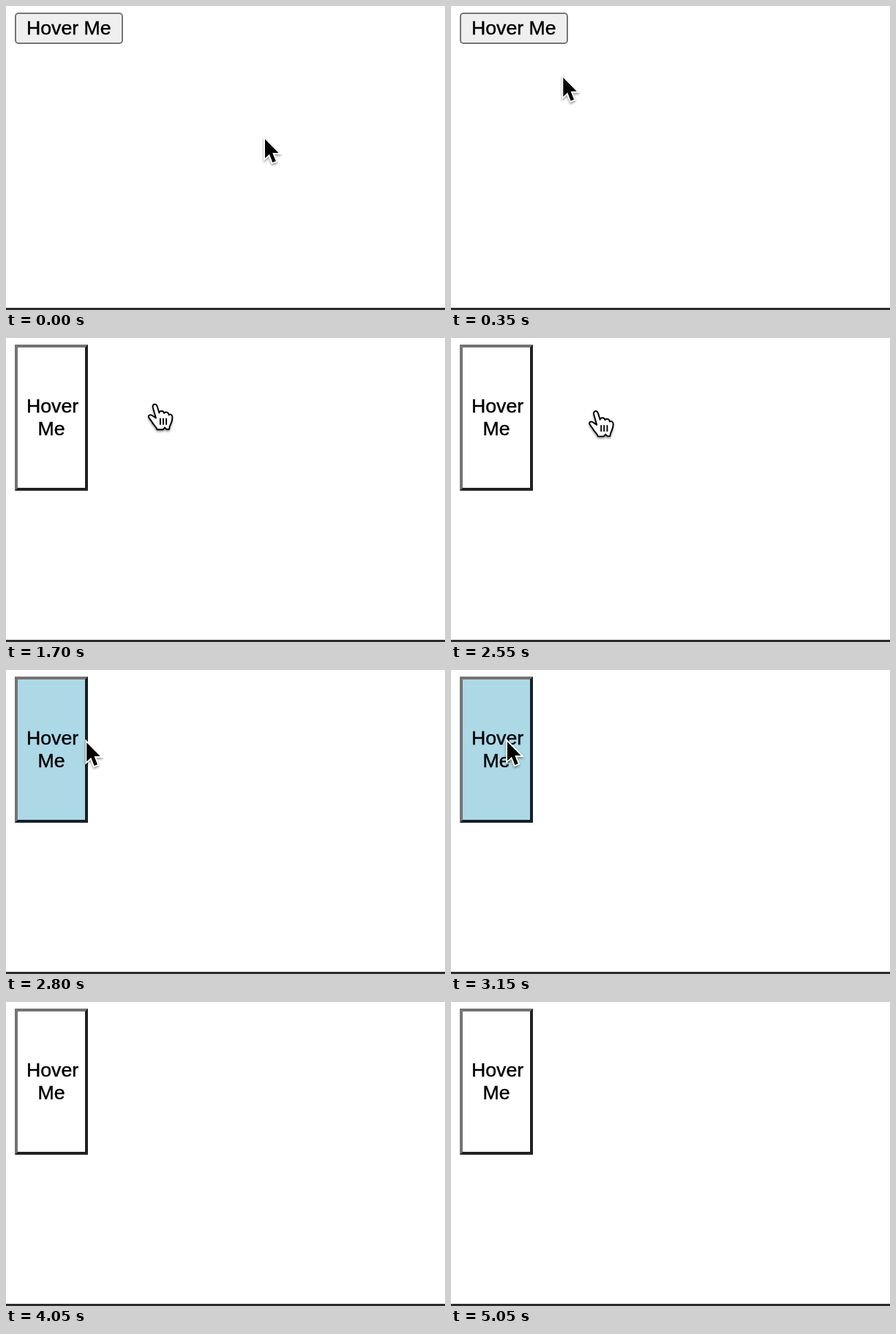
Animation of 600 by 416 pixels, one loop 5430 ms. Source, as an HTML page:

```html
<!DOCTYPE html>
<html lang="en">
<head>
<meta charset="utf-8">
<title>Hover button</title>
<style>
  html, body { margin: 0; width: 100%; height: 100%; overflow: hidden; background: #fff; }
  svg { display: block; width: 100%; height: 100%; }
  text {
    font: 26.667px "Liberation Sans", Arial, sans-serif;
    fill: #000; stroke: #000; stroke-width: .45px;
  }
  .shadow { filter: drop-shadow(0 2px 1.5px rgba(0, 0, 0, .4)); }
</style>
</head>
<body>
<svg viewBox="0 0 600 416">
  <rect y="413" width="600" height="3" fill="#2c2c2c"/>

  <g id="plain">
    <rect x="13" y="10" width="146" height="41" rx="4" fill="#efefef" stroke="#767676" stroke-width="2"/>
  </g>
  <g id="outset" transform="translate(12 9)">
    <rect id="dark"/>
    <path id="light" fill="#747474"/>
    <rect id="face" x="4" y="4"/>
  </g>
  <text id="oneLine" x="28" y="39">Hover Me</text>
  <g id="twoLines">
    <text x="28" y="102">Hover</text>
    <text x="43.5" y="133">Me</text>
  </g>

  <g id="arrow" class="shadow">
    <path d="M1 3.2V29.2L7 23.7L11.3 35L15.8 33.2L11.3 22H19.5Z"
      fill="#000" stroke="#fff" stroke-width="3.8" paint-order="stroke"/>
  </g>
  <g id="hand" class="shadow" stroke="#000" stroke-width="1.9" stroke-linecap="round" stroke-linejoin="round">
    <path fill="#fff" d="M11.5 20.5L7.5 6.5C6.3 1 11.7 0 13.2 4.5L16 13.5
      C16 10 22 10 22.8 14C24 11.5 28.5 12 29.3 16.2C31.5 14.5 34 16.5 34 19.5
      C34 25.5 32 28 30.5 31.5L29.5 36H26L23.5 33.5L21 36.3H13
      C12.5 32.5 8.5 30.5 6.5 26.5C5.3 24 2.5 21.5 1.6 19.3C.8 16 4.5 15.2 7 17.5Z"/>
    <path d="M17.5 21.5V29M21.5 21.5V29M25.7 21.5V29" fill="none"/>
  </g>
</svg>
<script>
const LOOP = 5430;
const STEP = 50;
const RESIZED_AT = 1550;
const POINTER_GONE_AT = 4050;

const easeOut = k => 1 - (1 - k) ** 2;
const smooth = k => k * k * (3 - 2 * k);

const far = { x: 353, y: 179 };
const onWide = { x: 98, y: 28 };
const aside = { x: 209, y: 99 };
const onTall = { x: 76, y: 95 };

const moves = [
  { start: 0, end: 650, from: far, to: onWide, easeX: easeOut, easeY: smooth },
  { start: 1450, end: 1850, from: onWide, to: aside, easeX: easeOut, easeY: easeOut },
  { start: 2500, end: 3100, from: aside, to: onTall, easeX: easeOut, easeY: easeOut },
  { start: 3500, end: 3920, from: onTall, to: aside, easeX: smooth, easeY: smooth }
];

const $ = id => document.getElementById(id);
const show = (id, on) => $(id).setAttribute("visibility", on ? "visible" : "hidden");
const mix = (a, b, k) => a + (b - a) * k;

function pointerAt(t) {
  const { start, end, from, to, easeX, easeY } = moves.findLast(move => move.start <= t);
  const k = Math.min(1, (t - start) / (end - start));
  return { x: mix(from.x, to.x, easeX(k)), y: mix(from.y, to.y, easeY(k)) };
}

function sizeRect(id, width, height, fill) {
  for (const [name, value] of Object.entries({ width, height, fill })) {
    $(id).setAttribute(name, value);
  }
}

function drawButton(tall, { x, y }) {
  const [w, h] = tall ? [100, 200] : [148, 43];
  const hovered = x < 12 + w && y < 9 + h;
  show("plain", !tall && !hovered);
  show("outset", tall || hovered);
  show("oneLine", !tall);
  show("twoLines", tall);
  sizeRect("dark", w, h, hovered ? "#172024" : "#222224");
  sizeRect("face", w - 8, h - 8, hovered ? "#add8e6" : "#fff");
  $("light").setAttribute("d", `M0 0H${w}l-4 4H4V${h - 4}l-4 4Z`);
}

function drawPointer(shape, { x, y }) {
  for (const id of ["arrow", "hand"]) {
    show(id, id === shape);
    $(id).setAttribute("transform", `translate(${x} ${y})`);
  }
}

const begin = performance.now();

function frame(now) {
  const elapsed = Math.max(0, now - begin) % LOOP;
  const t = Math.floor(elapsed / STEP) * STEP;
  const tall = t >= RESIZED_AT;
  const pointer = pointerAt(t);
  const shape = tall && pointer.x > 165 ? "hand" : "arrow";
  drawButton(tall, pointer);
  drawPointer(t < POINTER_GONE_AT ? shape : "none", pointer);
  requestAnimationFrame(frame);
}

frame(begin);
</script>
</body>
</html>
```
